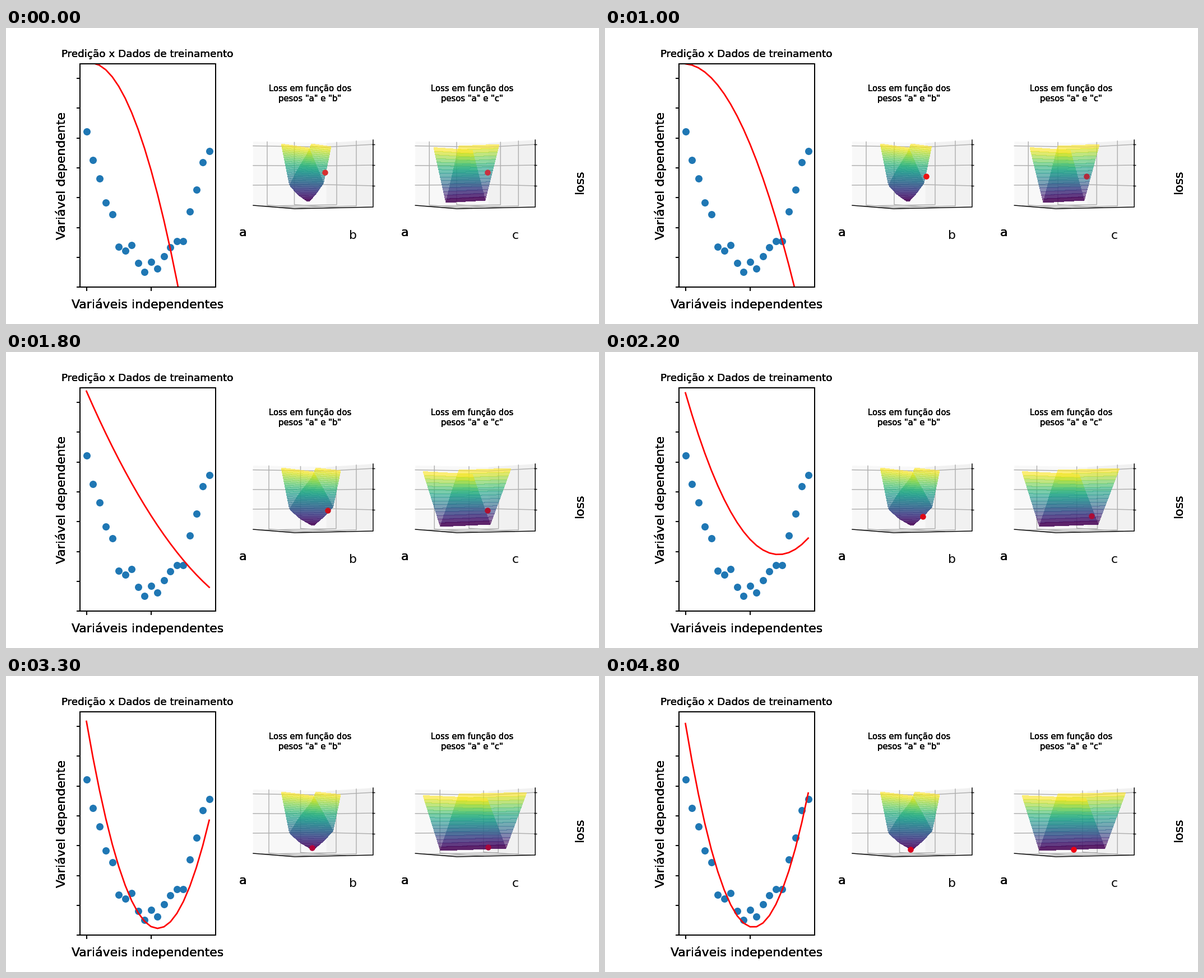
A matplotlib script for the animation above (4.9 s loop, 1058 px wide and 529 px high).

```python
import numpy as np
import matplotlib.pyplot as plt
from matplotlib.animation import FuncAnimation
from matplotlib.collections import PolyCollection
from matplotlib.colors import to_rgb
from matplotlib.patches import Polygon, Rectangle

W, H = 1058, 529
FRAMES, STEP = 49, 100
PT = 0.72           # points per pixel at 100 dpi
THIN = 1.47 * PT
PANEL_GAP = 289.3
HORIZON = 260

plt.rcParams["font.family"] = "DejaVu Sans"
fig = plt.figure(figsize=(W / 100, H / 100), dpi=100, facecolor="white")
ax = fig.add_axes([0, 0, 1, 1])
ax.set_xlim(0, W)
ax.set_ylim(H, 0)
ax.axis("off")

KEYS = [0, 10, 18, 26, 33, 42, 48]


def track(times, values):
    """Monotone cubic through the keys, sampled once per frame."""
    t, v = np.asarray(times, float), np.asarray(values, float)
    d = np.diff(v) / np.diff(t)
    m = np.zeros_like(v)
    m[0], m[-1] = d[0], d[-1]
    for i in range(1, len(v) - 1):
        if d[i - 1] * d[i] > 0:
            m[i] = 2 * d[i - 1] * d[i] / (d[i - 1] + d[i])
    f = np.arange(FRAMES)
    k = np.clip(np.searchsorted(t, f, side="right") - 1, 0, len(t) - 2)
    h = t[k + 1] - t[k]
    s = (f - t[k]) / h
    return (v[k] * (1 + 2 * s) * (1 - s) ** 2 + h * m[k] * s * (1 - s) ** 2
            + v[k + 1] * s * s * (3 - 2 * s) + h * m[k + 1] * s * s * (s - 1))


def color_track(names):
    rgb = np.array([to_rgb(n) for n in names])
    return np.column_stack([np.interp(np.arange(FRAMES), KEYS, c) for c in rgb.T])


def label(x, y, text, size, angle=0, passes=4):
    # several passes give the heavier antialiased edge
    for _ in range(passes):
        ax.text(x, y, text, fontsize=size * PT, rotation=angle, ha="center",
                va="baseline", rotation_mode="anchor", color="black", zorder=9)


def stroke(xs, ys, color="black", width=THIN, z=3, **kw):
    return ax.plot(xs, ys, color=color, lw=width, zorder=z, **kw)[0]


# ---- fit plot -------------------------------------------------------------

LEFT, RIGHT, TOP, BOTTOM = 132, 374, 63.5, 463
xs = 143.5 + 11.53 * np.arange(20)
t = (xs - 143.5) / 115
data = [185, 236, 269, 312, 333, 390.5, 398, 387.5, 419.5, 436,
        417.5, 430, 407.5, 391.5, 381, 381, 328, 289, 239.5, 220]

ax.plot(xs, data, "o", ms=13 * PT, mew=0, color="#1f77b4", zorder=2)
ax.add_patch(Rectangle((LEFT, TOP), RIGHT - LEFT, BOTTOM - TOP, fill=False,
                       ec="black", lw=2 * PT, zorder=5))
for i in range(8):
    y = 90 + i * 53.3
    stroke([125.5, LEFT], [y, y], width=2 * PT, solid_capstyle="butt")
for x in (143.5, 258.5):
    stroke([x, x], [BOTTOM, 469.5], width=2 * PT, solid_capstyle="butt")

label(252.5, 52.3, "Predição x Dados de treinamento", 18.37)
label(252.5, 501, "Variáveis independentes", 22.04)
label(106, 263.5, "Variável dependente", 22.04, 90)
label(1030, 275, "loss", 22.04, 90)

# the curve in pixels: base + slope * t + bend * t^2
FIT_KEYS = [0, 10, 18, 26, 30, 33, 42, 48]
base = track(FIT_KEYS, [63, 64, 70, 76, 79, 81, 83.5, 85])
slope = track(FIT_KEYS, [-26, 8.5, 264, 529.9, 636.4, 669.4, 691.7, 692.3])
bend = track(FIT_KEYS, [216, 134.5, -42, -224.9, -281.6, -302.7, -328.2, -329.2])
frame_no = np.arange(FRAMES)
slope = slope + np.where(frame_no > 36, 7 * np.sin(np.pi * frame_no / 3) ** 2, 0)

curve = stroke(xs, xs, "red", 2.7 * PT, 4, solid_joinstyle="round")
curve.set_clip_path(Rectangle((LEFT, TOP), RIGHT - LEFT, BOTTOM - TOP,
                              transform=ax.transData))

# ---- perspective boxes ----------------------------------------------------


def corner(x, height):
    return np.array([x, 1.0]) / height


FRONT, SIDE_R, SIDE_L = corner(515, 126), corner(655, 120), corner(441, 114)
AXIS_U, AXIS_V = SIDE_R - FRONT, SIDE_L - FRONT


def project(u, v, z):
    px, w = FRONT + u * AXIS_U + v * AXIS_V
    return px / w, HORIZON + (0.5 - z) / w


def solve(start, axis, x):
    """Position along a floor edge that shows at pixel column x."""
    return (x * start[1] - start[0]) / (axis[0] - x * axis[1])


def wall_line(x, left):
    if left:
        u = solve(SIDE_L, AXIS_U, x)
        path = [(u, 1, 1), (u, 1, 0), (u, 0, 0)]
    else:
        v = solve(SIDE_R, AXIS_V, x)
        path = [(1, v, 1), (1, v, 0), (0, v, 0)]
    return np.array([project(*p) for p in path])


def bands(left, right, n):
    """Strips between two edges, each a list of points from top to bottom."""
    sides = []
    for edge in (left, right):
        ex, ey = np.array(edge, float).T
        y = np.linspace(ey[0], ey[-1], n + 1)
        sides.append(np.column_stack([np.interp(y, ey, ex), y]))
    a, b = sides
    return [[a[i], b[i], b[i + 1], a[i + 1]] for i in range(n)]


grow = track(KEYS, [0, 0.15, 1, 1, 1, 1, 1])


def bowl(i):
    r, c = 17 * grow[i], 8 * grow[i]
    tip = (538 + c, 310)
    low_l = [(506, 281), (521 + c / 2, 298), tip]
    low_r = [(566.5 + r, 277), (554 + (r + c) / 2, 295), (tip[0] + 3, 310)]
    near = bands([(491, 207)] + low_l,
                 [(540 + c, 214), (553 + (r + c) / 2, 244)] + low_r, 30)
    far = bands([(545 + c, 207), (538 + c, 224), (520 + c / 3, 254)] + low_l,
                [(580 + r, 212)] + low_r, 30)
    return far + near


top_l = track(KEYS, [763, 758, 744, 744, 744, 744, 744])
low_l = track(KEYS, [785, 782, 775, 775, 775, 775, 775])
inner = track(KEYS, [832, 830, 832, 858, 858, 858, 858])
top_r = track(KEYS, [880, 882, 901, 929, 929, 929, 929])
low_r = track(KEYS, [855, 855, 864, 892, 892, 892, 892])


def trough(i):
    foot_l, foot_r = (low_l[i], 312), (low_r[i], 308)
    near = bands([(top_l[i], 213.5), foot_l], [(inner[i], 218.5), foot_r], 15)
    far = bands([(808, 211), foot_l], [(top_r[i], 208), foot_r], 15)
    return far + near


class Panel:
    def __init__(self, dx, name, surface, count, grid, dot_x, dot_y, dot_rgb):
        self.dx, self.surface, self.grid = dx, surface, grid
        self.dot_x, self.dot_y, self.dot_rgb = dot_x, dot_y, dot_rgb
        self.pane([(0, 0), (1, 0), (1, 1), (0, 1)], "#f6f6f6")
        self.pane([(0, 1), (1, 1)], "#f8f8f8", wall=True)
        self.pane([(1, 1), (1, 0)], "#f1f1f1", wall=True)
        for z in (0.933, 0.625, 0.317):
            self.path([(0, 1, z), (1, 1, z), (1, 0, z)], "#b0b0b0", 2)
            y = project(1, 0, z)[1]
            stroke([653 + dx, 657.5 + dx], [y, y], solid_capstyle="butt")
        self.path([(0, 1, 0), (0, 0, 0), (1, 0, 0), (1, 0, 1)], "black", 3)
        self.lines = [stroke([], [], "#b0b0b0", z=2) for _ in range(4)]
        shades = plt.cm.viridis(np.linspace(1, 0, count))
        self.mesh = PolyCollection(surface(0), facecolors=np.tile(shades, (2, 1)),
                                   edgecolors="none", alpha=0.62,
                                   antialiaseds=False, zorder=4)
        ax.add_collection(self.mesh, autolim=False)
        self.dot = ax.plot([], [], "o", ms=10.5 * PT, mew=0, zorder=6)[0]
        label(542.4 + dx, 113.3, "Loss em função dos", 14.7)
        label(542.4 + dx, 131.3, f'pesos "a" e "{name}"', 14.7)
        label(422.3 + dx, 371.7, "a", 22.04)
        label(619.3 + dx, 377, name, 22.04, passes=1)

    def pane(self, floor, color, wall=False):
        pts = [project(u, v, 0) for u, v in floor]
        if wall:
            pts += [project(u, v, 1) for u, v in reversed(floor)]
        ax.add_patch(Polygon(np.array(pts) + [self.dx, 0], fc=color, ec="none",
                             zorder=1))

    def path(self, points, color, z):
        p = np.array([project(*q) for q in points])
        stroke(p[:, 0] + self.dx, p[:, 1], color, z=z)

    def draw(self, i):
        for k, line in enumerate(self.lines):
            p = wall_line(self.grid[k][i], k < 2)
            line.set_data(p[:, 0] + self.dx, p[:, 1])
        self.mesh.set_verts(self.surface(i))
        self.dot.set_data([self.dot_x[i]], [self.dot_y[i]])
        self.dot.set_color(self.dot_rgb[i])


grid_b = [track(KEYS, k) for k in (
    [466, 466, 469, 469, 469, 469, 469],
    [514.5, 516, 525.5, 525.5, 525.5, 525.5, 525.5],
    [590, 589, 589, 589, 589, 589, 589],
    [625] * 7)]
grid_c = [track(KEYS, k) for k in (
    [466, 466, 475, 485, 485, 485, 485],
    [514.7, 518.7, 536.7, 562.7, 562.7, 562.7, 562.7],
    [593, 588, 589.5, 589, 589, 589, 589],
    [625] * 7)]

panels = [
    Panel(0, "b", bowl, 30, grid_b,
          track(KEYS, [569, 573, 574, 557, 546.3, 545.3, 545.3]),
          track(KEYS, [258, 265.3, 283.3, 302.5, 306.5, 309.8, 310]),
          color_track(["#d62f30", "#ee1111", "#cc0f1a", "#ee0011",
                       "#b3003a", "#ea0010", "#d8001e"])),
    Panel(PANEL_GAP, "c", trough, 15, grid_c,
          track(KEYS, [858.5, 858.5, 858.5, 877, 860.3, 846, 835.5]),
          track(KEYS, [257.5, 264.7, 282.5, 300.5, 306, 309, 310]),
          color_track(["#c83040", "#b22a3c", "#b01030", "#a8063a",
                       "#a8063a", "#ee0010", "#ee0012"])),
]


def draw(i):
    curve.set_data(xs, base[i] + slope[i] * t + bend[i] * t ** 2)
    for panel in panels:
        panel.draw(i)
    return []


anim = FuncAnimation(fig, draw, frames=FRAMES, init_func=lambda: draw(0),
                     interval=STEP, repeat=True, repeat_delay=0, blit=False)
plt.show()
```
